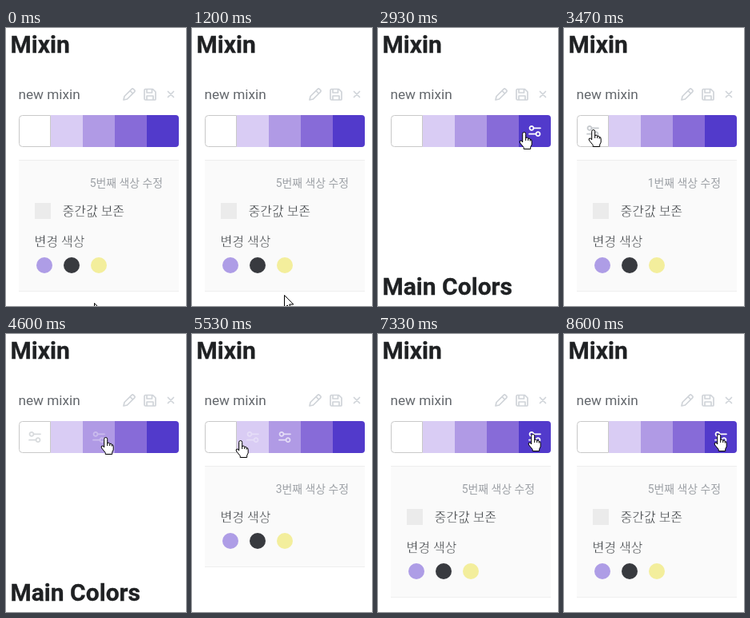
Recreate the animation shown at these times as an HTML page. Size 225 by 348 pixels, loop 9.13 s.

```html
<!DOCTYPE html>
<html lang="ko">
<head>
<meta charset="utf-8">
<style>
html, body { margin: 0; width: 100%; height: 100%; overflow: hidden; background: #fff; }
svg { display: block; width: 225px; height: 348px; font-family: Roboto, 'Noto Sans CJK KR', 'Noto Sans CJK', sans-serif; }
.h { font-size: 30px; font-weight: 700; fill: #1f2123; stroke: #1f2123; stroke-width: .3px; }
.name { font-size: 17.2px; fill: #63676c; }
/* the panel-coloured outline thins the strokes */
.label { font-size: 16px; fill: #33373b; stroke: #fafafa; stroke-width: .45px; }
.hint { font-size: 13.9px; fill: #9da1a6; text-anchor: end; }
.line { fill: none; stroke-linecap: round; stroke-linejoin: round; stroke-width: 1.7px; }
</style>
</head>
<body>
<svg viewBox="0 0 225 348">
  <text class="h" x="5.500" y="30.500">Mixin</text>
  <text class="name" x="15.500" y="89">new mixin</text>
  <g class="line" stroke="#d0d4d9">
    <path d="M147 90l1-4.500 9.200-9.200q1-1 2 0l1.500 1.500q1 1 0 2l-9.200 9.200zM155 78.500l3.500 3.500"/>
    <path d="M174.500 76.500h9l3.500 3.500v9q0 1-1 1h-11.500q-1.500 0-1.500-1.500v-10.500q0-1.500 1.500-1.500zM176 77v4h6.500v-4M176 90v-5h8v5"/>
    <path d="M202.500 79.500l7 7m0-7l-7 7"/>
  </g>
  <clipPath id="round"><rect x="16" y="109" width="200" height="40" rx="4"/></clipPath>
  <g id="bar" clip-path="url(#round)"></g>
  <path fill="none" stroke="#c9c9c9" d="M55.500 109.500H20.500a4 4 0 0 0-4 4v31a4 4 0 0 0 4 4H55.500Z"/>
  <g id="icons"></g>
  <text class="h" id="next" x="5.500" y="333.500">Main Colors</text>
  <g id="panel">
    <rect id="back" x="16" y="165" width="200" fill="#fafafa"/>
    <path d="M16 165.500h200" stroke="#eee"/>
    <text class="hint" id="hint" x="196" y="199"></text>
    <g id="keep">
      <rect x="36" y="219" width="20" height="20" fill="#ebebeb"/>
      <text class="label" x="70.500" y="235">중간값 보존</text>
    </g>
    <g id="change">
      <text class="label" x="35.500" y="273">변경 색상</text>
      <circle cx="48" cy="297" r="10" fill="#ae9de6"/>
      <circle cx="82" cy="297" r="10" fill="#383a3f"/>
      <circle cx="116" cy="297" r="10" fill="#f3ee9c"/>
      <path d="M16 329.500h200" stroke="#eee"/>
    </g>
  </g>
  <g id="cursor" fill="#fff" stroke="#000" stroke-linejoin="round">
    <path id="arrow" d="M.5 .5V16.500L4.300 13L6.800 18.700L9.200 17.600L6.700 12H11.800Z"/>
    <g id="hand" transform="translate(.7 0)">
      <path d="M-2 13V2.500Q-2 .5 0 .5T2 2.500V7.500Q4.500 6 5 8.500Q7.300 7.300 7.500 9.500Q9.500 9 9.500 12V16L8 19V21.500H-.5V19.500L-5 14Q-6.500 11.500-4.700 11T-2 13Z"/>
      <path fill="none" d="M2 7V11M5 8.500V11M7.500 9.500V11.500"/>
    </g>
  </g>
</svg>
<script>
const LOOP = 9130, STEP = 1000 / 15;
const colors = ['#fff', '#d9ccf4', '#b09ae5', '#876bd8', '#523acb'];
const $ = id => document.getElementById(id);
const show = (id, on) => $(id).style.display = on ? '' : 'none';

// pointer moves: start ms, end ms, x, y
const moves = [
  [1100, 1733, 195, 116], [1733, 2000, 193, 125], [2880, 3200, 36, 127], [4440, 4533, 124, 129],
  [5220, 5600, 38, 128], [5870, 6270, 110, 128], [6800, 7133, 193, 125]
];
const clicks = [2333, 3466, 4133, 5000, 5666, 6600, 7266, 8000, 8600];

colors.forEach((c, i) => {
  $('bar').innerHTML += `<rect x="${16 + 40 * i}" y="109" width="40" height="40" fill="${c}"/>`;
  $('icons').innerHTML += `<g class="line" stroke="${i ? '#fff' : '#c4c8cc'}" transform="translate(${36 + 40 * i} 129)">
    <circle cx="-4" cy="-3.700" r="2.500"/><circle cx="4" cy="3.700" r="2.500"/>
    <path d="M-1.500-3.700H7M-7 3.700H1.500"/></g>`;
});
const icons = [...$('icons').children];

// each move speeds up and sags slightly
function tip(t) {
  let x = 110, y = 344;
  for (const [start, end, u, v] of moves) {
    const f = Math.min(1, Math.max(0, (t - start) / (end - start)));
    const e = f ** 1.5;
    x += (u - x) * e;
    y += (v - y) * e + 10 * Math.sin(Math.PI * f);
  }
  return [Math.round(x), Math.round(y)];
}

// swatch number under the pointer, 0 = none
function hovered(t) {
  const [x, y] = tip(t);
  return y >= 109 && y < 150 ? Math.floor((x + 24) / 40) : 0;
}

// a click opens the swatch's panel, or closes it if already open
function edited(t) {
  return clicks.filter(c => c <= t).reduce((open, c) => {
    const hit = hovered(c);
    return hit === open ? 0 : hit;
  }, 5);
}

function draw(t) {
  const over = hovered(t), pick = edited(t), middle = pick > 1 && pick < 5;
  $('cursor').setAttribute('transform', `translate(${tip(t)})`);
  show('hand', over);
  show('arrow', !over);
  // icons fade over three steps
  icons.forEach((el, i) => {
    el.style.opacity = [1, 2, 3].filter(d => hovered(t - d * STEP) === i + 1).length / 3;
  });
  show('panel', pick);
  show('next', !pick);
  show('keep', !middle);
  $('hint').textContent = pick + '번째 색상 수정';
  $('change').setAttribute('transform', `translate(0 ${middle ? -38 : 0})`);
  $('back').setAttribute('height', middle ? 127 : 165);
}

function tick() {
  const t = performance.now() % LOOP;
  draw(Math.floor((t + 4) / STEP) * STEP);
  requestAnimationFrame(tick);
}
tick();
</script>
</body>
</html>
```
